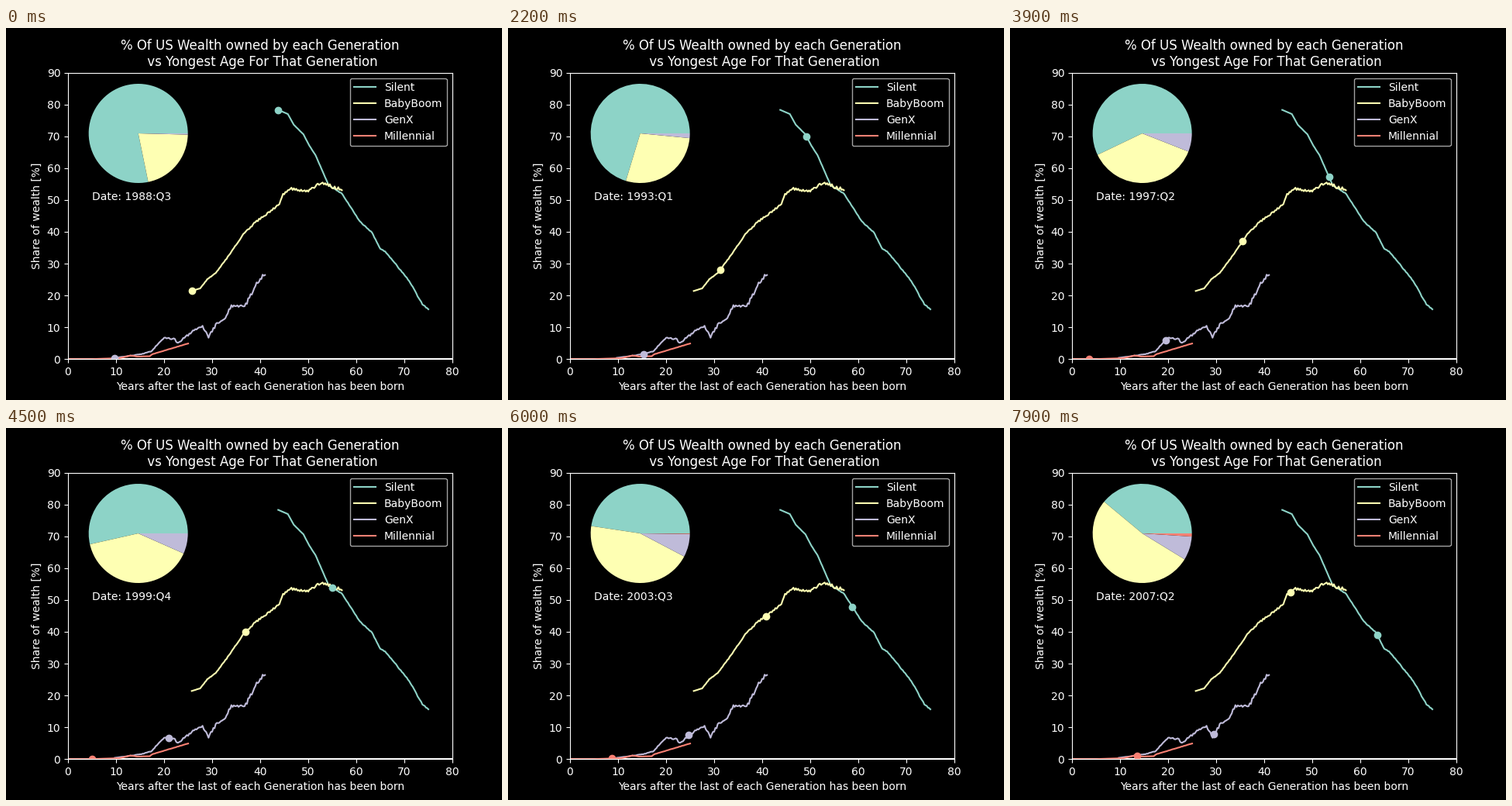
A matplotlib script that plays this animation: 640x480 px, repeating every 8000 ms.

```python
import numpy as np
import matplotlib.pyplot as plt
from matplotlib.animation import FuncAnimation
from matplotlib.patches import Wedge

FRAMES = 80
QUARTERS = 126

# name, color, roughness, key points (youngest age, share of wealth in %)
GENERATIONS = [
    ("Silent", "#8dd3c7", 0.2,
     [(43.75, 78.3), (45.75, 77), (47, 73.6), (49, 70.6), (50.25, 67),
      (51.5, 64.1), (54.25, 54.6), (57, 52), (60.75, 43.2), (63.25, 39.8),
      (65, 34.6), (66, 33.9), (71, 24.6), (73.75, 17.2), (75, 15.6)]),
    ("BabyBoom", "#feffb3", 0.6,
     [(25.75, 21.4), (27.5, 22.2), (29, 25.1), (30.75, 27), (33.5, 32.6),
      (36.5, 39.2), (39, 43), (42.75, 47.2), (44, 48.6), (44.75, 51.7),
      (46.5, 53.5), (50, 52.6), (52.75, 55.5), (57, 53)]),
    ("GenX", "#bfbbd9", 0.6,
     [(9.75, 0.4), (15.25, 1.5), (17.25, 2.4), (20, 6.6), (22.25, 6.3),
      (22.75, 4.9), (26.25, 9.1), (28, 10.3), (29.25, 7), (31, 11.3),
      (32.5, 12.5), (34, 16.8), (36.75, 16.4), (39.25, 23.6), (41, 27)]),
    ("Millennial", "#fa8174", 0.04,
     [(-6.25, 0), (5, 0), (10.75, 0.3), (13, 1.1), (14.5, 0.8),
      (17, 0.9), (17.5, 1.5), (25, 4.9)]),
]


def quarterly(keys, rough, rng):
    """Quarterly shares through the key points, rougher with time."""
    x, y = np.array(keys).T
    step = np.arange(QUARTERS)
    ages = x[0] + step / 4
    share = np.interp(ages, x, y)
    noise = rng.uniform(-1, 1, QUARTERS) * rough * step / QUARTERS
    return ages, share + noise * np.minimum(share, 1)


plt.style.use("dark_background")
rng = np.random.default_rng(4)

fig, ax = plt.subplots(figsize=(6.4, 4.8), dpi=100)
ax.axhline(0, color="white", zorder=1)
series = []
for name, color, rough, keys in GENERATIONS:
    series.append(quarterly(keys, rough, rng))
    ax.plot(*series[-1], color=color, label=name)
dots = [ax.plot([], [], "o", color=g[1])[0] for g in GENERATIONS]
date = ax.text(5, 50, "")
ax.set(xlim=(0, 80), ylim=(0, 90),
       xlabel="Years after the last of each Generation has been born",
       ylabel="Share of wealth [%]")
ax.set_title("% Of US Wealth owned by each Generation\n"
             " vs Yongest Age For That Generation")
ax.legend(loc="upper right")

pie = fig.add_axes([0.1, 0.55, 1 / 3, 1 / 3])
pie.set(xlim=(-1.25, 1.25), ylim=(-1.25, 1.25), aspect="equal")
pie.axis("off")
wedges = [pie.add_patch(Wedge((0, 0), 1, 0, 1, facecolor=g[1], linewidth=0))
          for g in GENERATIONS]


def update(i):
    shares = np.array([share[i] for _, share in series])
    bounds = np.concatenate([[0], np.cumsum(shares / shares.sum() * 360)])
    for k, (ages, share) in enumerate(series):
        dots[k].set_data([ages[i]], [share[i]])
        wedges[k].set_theta1(bounds[k])
        wedges[k].set_theta2(bounds[k + 1])
    date.set_text(f"Date: {1988 + i // 4}:Q{(i + 2) % 4 + 1}")
    return [*dots, *wedges, date]


anim = FuncAnimation(fig, update, frames=FRAMES, interval=100,
                     init_func=lambda: update(0), repeat=True, repeat_delay=0)
plt.show()
```
